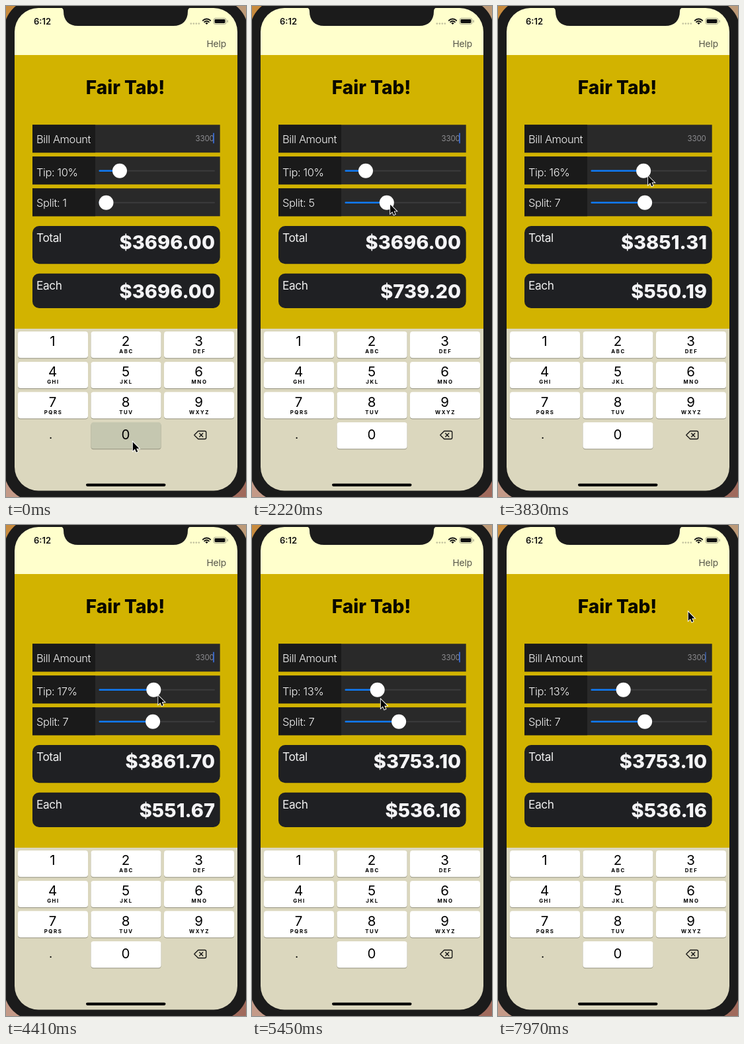
Animation of 363x741 px, one loop 8000 ms. Source, as an HTML page with a canvas:

```html
<!DOCTYPE html>
<html lang="en">
<head>
<meta charset="utf-8">
<title>Tip calculator</title>
<style>
  html, body { margin: 0; width: 100%; height: 100%; overflow: hidden; background: #1a1a1a; }
  canvas { display: block; width: 363px; height: 741px; }
</style>
</head>
<body>
<canvas id="stage"></canvas>
<script>
const W = 363, H = 741, LOOP = 8000, STEP = 147.6;
const canvas = document.getElementById('stage');
const ratio = window.devicePixelRatio || 1;
canvas.width = W * ratio;
canvas.height = H * ratio;
const ctx = canvas.getContext('2d');
ctx.scale(ratio, ratio);

// Eased progress from 0 to 1 between two steps
function glide(step, from, to) {
  const f = Math.min(1, Math.max(0, (step - from) / (to - from)));
  return f * f * (3 - 2 * f);
}

// Each move: first step, last step, destination
const moves = [
  [1, 8, 155, 298],
  [11, 17, 227, 299],
  [18, 22, 177, 252],
  [22, 27, 232, 256],
  [28.7, 37, 194, 262],
  [37, 44, 209, 357],
  [45, 49, 91, 434],
  [51, 54, 287, 130]
];

function cursorAt(step) {
  let x = 191, y = 657;
  for (const [from, to, toX, toY] of moves) {
    const f = glide(step, from, to);
    x += (toX - x) * f;
    y += (toY - y) * f;
  }
  return [x, y];
}

function rect(x, y, w, h, color, r = 0) {
  ctx.fillStyle = color;
  ctx.beginPath();
  ctx.roundRect(x, y, w, h, r);
  ctx.fill();
}

// y is the middle of the capital letters
function text(str, x, y, size, weight, color, align = 'left', spacing = 0) {
  ctx.font = `${weight} ${size}px Inter, "Open Sans", sans-serif`;
  ctx.letterSpacing = spacing + 'px';
  ctx.textAlign = align;
  ctx.fillStyle = color;
  ctx.fillText(str, x, y + size * 0.364);
  ctx.letterSpacing = '0px';
}

function drawPhone() {
  const corners = ['#c88b3e', '#bd9a78', '#c49a88', '#a06a5c'];
  corners.forEach((color, i) => rect(i % 2 * W / 2, i > 1 ? H / 2 : 0, W / 2, H / 2, color));
  rect(-3, -10, 369, 757, '#1b1b1b', 47);

  ctx.save();
  ctx.beginPath();
  ctx.roundRect(13, 3, 337, 728.5, 36);
  ctx.clip();
  rect(13, 3, 337, 72, '#ffffcc');
  rect(13, 74, 337, 414, '#d2b300');
  rect(13, 487, 337, 245, '#dbd7be');
  ctx.restore();

  ctx.fillStyle = '#1b1b1b';
  ctx.beginPath();
  ctx.moveTo(82, 2);
  ctx.quadraticCurveTo(87, 3, 87, 8);
  ctx.bezierCurveTo(87, 22, 95, 30, 109, 30);
  ctx.lineTo(253, 30);
  ctx.bezierCurveTo(267, 30, 275, 22, 275, 8);
  ctx.quadraticCurveTo(275, 3, 280, 2);
  ctx.fill();
  rect(121, 720.7, 120.5, 4.2, '#000', 2.1);
}

function drawStatus() {
  text('6:12', 55, 23, 13, 600, '#111', 'center');
  for (let i = 0; i < 4; i++) rect(278.5 + i * 4, 25.3, 2.6, 2.6, '#c2c29f', 1.3);
  ctx.strokeStyle = '#111';
  ctx.lineWidth = 2;
  for (const r of [8, 4.8]) {
    ctx.beginPath();
    ctx.arc(303.5, 27.5, r, -Math.PI * 0.75, -Math.PI * 0.25);
    ctx.stroke();
  }
  ctx.fillStyle = '#111';
  ctx.beginPath();
  ctx.moveTo(303.5, 28);
  ctx.arc(303.5, 28, 3, -Math.PI * 0.75, -Math.PI * 0.25);
  ctx.fill();
  ctx.strokeStyle = '#a5a58c';
  ctx.lineWidth = 1;
  ctx.beginPath();
  ctx.roundRect(314, 18.5, 19, 9, 2.7);
  ctx.stroke();
  rect(315.5, 20, 16, 6, '#111', 1.4);
  rect(334.5, 21.2, 1.3, 3.6, '#a5a58c', 0.6);
  text('Help', 333, 57, 13.7, 400, '#55554a', 'right', -0.1);
}

function drawRow(y, label, labelY) {
  rect(40, y, 283.7, 42, '#292929');
  rect(40, y, 95, 42, '#1a1a1a');
  text(label, 46, labelY, 16.5, 300, '#f2f2f2', 'left', -0.4);
}

function drawSlider(y, x) {
  rect(140.5, y - 1, 175.5, 2, '#3b3b3d', 1);
  rect(140.5, y - 1.2, x - 140.5, 2.4, '#0f7af5', 1.2);
  rect(x - 11, y - 11, 22, 22, '#fff', 11);
}

function drawAmount(y, h, label, labelY, amount, amountY) {
  rect(40, y, 283.7, h, '#1f2023', 10);
  text(label, 46, labelY, 17.3, 400, '#f2f2f2', 'left', -0.4);
  text('$' + amount.toFixed(2), 316, amountY, 29, 800, '#f4f4f6', 'right');
}

function drawBackspace(x, y) {
  ctx.strokeStyle = '#111';
  ctx.lineWidth = 1.3;
  ctx.lineJoin = ctx.lineCap = 'round';
  ctx.beginPath();
  ctx.moveTo(x - 9, y);
  ctx.lineTo(x - 3, y - 6);
  ctx.arcTo(x + 9, y - 6, x + 9, y, 2);
  ctx.arcTo(x + 9, y + 6, x - 3, y + 6, 2);
  ctx.lineTo(x - 3, y + 6);
  ctx.closePath();
  for (const side of [-1, 1]) {
    ctx.moveTo(x + 1.5 - 2.5 * side, y - 2.5);
    ctx.lineTo(x + 1.5 + 2.5 * side, y + 2.5);
  }
  ctx.stroke();
}

function drawKeyboard(pressed) {
  const letters = ['', 'ABC', 'DEF', 'GHI', 'JKL', 'MNO', 'PQRS', 'TUV', 'WXYZ'];
  const key = (col, row, digit, sub, color) => {
    const x = 18 + col * 110.5, y = 491.2 + row * 45.7;
    rect(x, y + 1, 106, 40, '#94927f', 4);
    rect(x, y, 106, 40, color, 4);
    text(digit, x + 52.5, y + (digit === '0' ? 18.7 : 14.5), 20.5, 400, '#000', 'center');
    text(sub, x + 53.5, y + 30.3, 7.8, 700, '#000', 'center', 1.6);
  };
  letters.forEach((sub, i) => key(i % 3, Math.floor(i / 3), String(i + 1), sub, '#fff'));
  key(1, 3, '0', '', pressed ? '#c5c7b0' : '#fff');
  rect(66.5, 650.8, 2.2, 2.2, '#000', 1.1);
  drawBackspace(293.7, 647.5);
}

function drawCaret(time) {
  const phase = time % 1000 / 1000;
  const fadeOut = 1 - (phase - 0.48) / 0.18;
  const fadeIn = (phase - 0.92) / 0.08;
  ctx.globalAlpha = Math.min(1, Math.max(0, fadeOut, fadeIn));
  rect(313.2, 191.5, 1.6, 16, '#3b73e6', 0.8);
  ctx.globalAlpha = 1;
}

function drawCursor(x, y) {
  const outline = new Path2D('M0 0V13.4L3.1 10.5L5.3 15.5L7.5 14.5L5.4 9.7H9.6Z');
  ctx.save();
  ctx.translate(x + 0.8, y + 1);
  ctx.lineJoin = 'miter';
  ctx.strokeStyle = '#fff';
  ctx.lineWidth = 1.8;
  ctx.stroke(outline);
  ctx.fillStyle = '#000';
  ctx.fill(outline);
  ctx.restore();
}

function draw(time) {
  const step = Math.floor((time + 20) / STEP);
  const tip = 0.12 + 0.052526 * glide(step, 22, 27) - 0.035223 * glide(step, 28.703, 37);
  const splitPart = 0.46 * glide(step, 11, 17);
  const split = Math.floor(1 + splitPart * 14);
  const percent = step > 22 ? Math.floor(tip * 100) : 10;
  const total = 3300 * (1 + tip);

  drawPhone();
  drawStatus();
  text('Fair Tab!', 180.5, 123, 28, 800, '#0a0900', 'center');

  drawRow(179.3, 'Bill Amount', 201);
  drawRow(227.3, `Tip: ${percent}%`, 250.5);
  drawRow(275.3, `Split: ${split}`, 296.5);
  text('3300', 314.5, 199.5, 11.5, 400, '#8c8c90', 'right', -0.2);
  drawCaret(step * STEP);
  drawSlider(248.8, 151.5 + (tip - 0.1) / 0.15 * 153.5);
  drawSlider(296.7, 151.5 + splitPart * 153.5);

  drawAmount(332, 57.3, 'Total', 350.2, total, 356.3);
  drawAmount(403.7, 52.3, 'Each', 421.8, total / split, 430);
  drawKeyboard(step < 1);
  drawCursor(...cursorAt(step));
}

const start = performance.now();
function tick() {
  draw((performance.now() - start) % LOOP);
  requestAnimationFrame(tick);
}
tick();
</script>
</body>
</html>
```
